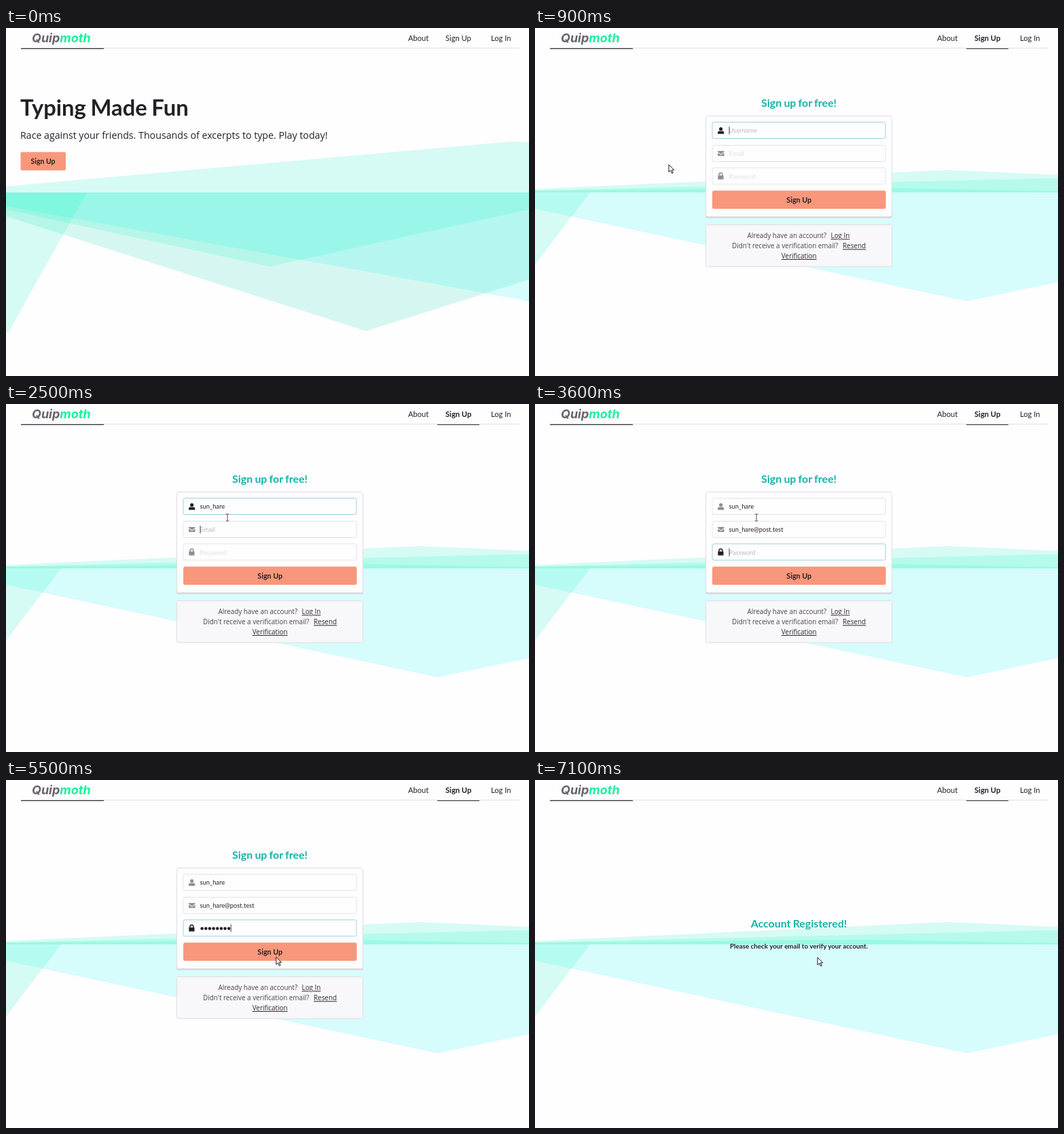
Animation, 770 px wide and 512 px high, one loop 7200 ms. Source, as an HTML page:

```html
<!DOCTYPE html>
<html lang="en">
<head>
<meta charset="utf-8">
<title>Sign up</title>
<style>
html, body { margin: 0; width: 100%; height: 100%; overflow: hidden; background: #fefdff; }
svg { display: block; width: 770px; height: 512px; font-family: Lato, sans-serif; fill: #242126; }
.b { font-weight: 700; }
.mid { text-anchor: middle; }
.tight { word-spacing: -.04em; }
.teal { fill: #14b3a9; font-weight: 700; font-size: 15.9px; }
.nav { font-size: 11.15px; }
.sans { font-family: "Open Sans", "Noto Sans", sans-serif; }
.note { font-size: 9.9px; fill: #49464c; }
.link { text-decoration: underline; fill: #2c292f; }
.logo { font: italic 700 18px Inter, sans-serif; fill: #69646b; }
.field { font-size: 9.3px; }
.box { fill: #fefdff; stroke: #dfdde2; }
.coral { fill: #f8977b; }
.rule { stroke: #3b353c; stroke-width: 1.2; }
.off { display: none; }
</style>
</head>
<body>
<svg viewBox="0 0 770 512">
  <g id="home">
    <g id="homeBg"></g>
    <text class="b tight" x="21" y="129" font-size="32.75">Typing Made Fun</text>
    <text class="sans" x="21" y="163" font-size="14.2">Race against your friends. Thousands of excerpts to type. Play today!</text>
    <rect class="coral" x="21.5" y="182.5" width="66.5" height="27" rx="2.5"/>
    <text class="b mid" x="54.5" y="199.7" font-size="10.5">Sign Up</text>
  </g>

  <g id="inner">
    <g id="innerBg"></g>
    <path class="rule" d="M635 30.4h62"/>
  </g>

  <g id="form">
    <text class="teal mid tight" x="388.5" y="116">Sign up for free!</text>
    <rect x="251" y="131" width="275" height="148.7" rx="3" fill="#d9d7dc"/>
    <rect class="box" x="251.5" y="129.5" width="274" height="148" rx="3"/>
    <g id="fields"></g>
    <rect class="coral" x="261" y="239.3" width="255.5" height="26.7" rx="2.5"/>
    <text class="b mid" x="388.7" y="256.6" font-size="10.7">Sign Up</text>
    <rect class="box" x="251.5" y="289.5" width="274" height="61.5" rx="2" style="fill:#f8f7fa"/>
    <g class="sans note">
      <text x="312.6" y="309.3">Already have an account?</text>
      <text class="link" x="435.5" y="309.3">Log In</text>
      <text x="290" y="324.3">Didn't receive a verification email?</text>
      <text class="link" x="453" y="324.3">Resend</text>
      <text class="link" x="362.7" y="339">Verification</text>
    </g>
  </g>

  <g id="done">
    <text class="teal mid tight" x="388.5" y="216.7">Account Registered!</text>
    <text class="b mid" x="388.5" y="247.6" font-size="9.8">Please check your email to verify your account.</text>
  </g>

  <path d="M22 29.5h734" stroke="#e3e0e5"/>
  <path class="rule" d="M22 30.4h122"/>
  <text class="logo" x="38" y="20.8">Quip<tspan fill="#18f29b">moth</tspan></text>
  <g class="nav">
    <text x="592" y="19.3">About</text>
    <text id="navSign" x="647" y="19.3">Sign Up</text>
    <text x="714" y="19.3">Log In</text>
  </g>

  <path id="arrow" d="M0 0v11l2.6-2.3 2 4.2 1.7-.8-2-4.1h3.4z" fill="#fff" stroke="#1c1a1e" stroke-width="1"/>
  <path id="beam" d="M-2.3-5h1.8q.5 0 .5.6.0-.6.5-.6h1.8M0-4.5v9M-2.3 5h1.8q.5 0 .5-.6.0.6.5.6h1.8" fill="none" stroke="#55525a"/>
</svg>

<script>
const LOOP = 7200, STEP = 100;
const OPEN = 900, REGISTERED = 5600;
const $ = id => document.getElementById(id);
const show = (el, on) => el.classList.toggle('off', !on);

// Translucent background shapes: colour, then points
function backdrop(id, shapes) {
  $(id).innerHTML = shapes.map(([rgb, points]) =>
    `<polygon points="${points}" fill="rgb(${rgb})" fill-opacity=".158"/>`).join('');
}
const mint = '0,240,184', green = '0,216,164', aqua = '0,246,232';
backdrop('homeBg', [
  [mint, '0,233 745,167 770,168 770,242 0,242'],
  [green, '0,242 770,242 770,370 530,446 0,277'],
  [aqua, '0,242 770,242 770,402 0,262'],
  [mint, '0,242 770,242 770,267 388,351 0,267'],
  [mint, '0,242 119,242 3,449 0,447']
]);
backdrop('innerBg', [
  [mint, '0,237 608,209 770,216 770,242 0,242'],
  [mint, '0,239 770,221 770,242 0,242'],
  [mint, '0,239.5 480,235 770,240 770,242 0,242'],
  [aqua, '0,242 770,242 770,374 635,402 0,266'],
  [mint, '0,242 81,242 0,348']
]);

// Form fields: typing runs from `from` to `to`, focus begins at `focus`
const fields = [
  { y: 138.5, hint: 'Username', value: 'sun_hare', focus: OPEN, from: 1700, to: 2400,
    icon: 'M273.6 146a2.6 2.6 0 0 1 0 5.2a2.6 2.6 0 0 1 0-5.2M269 155.7v-1.2q0-2.7 2.7-2.9q1.9.9 3.8 0q2.8.2 2.8 2.9v1.2z' },
  { y: 172.5, hint: 'Email', value: 'sun_hare@post.test', focus: 2500, from: 2700, to: 3400,
    icon: 'M269 181h9.5v1.2l-4.7 3.4l-4.8-3.4zM269 183.4l4.8 3.3l4.7-3.3v4.9h-9.5z' },
  { y: 205.8, hint: 'Password', value: '********', secret: true, focus: 3500, from: 3700, to: 4400,
    icon: 'M269.3 217h.9v-1.2a3.2 3.2 0 0 1 6.4 0v1.2h.9v5.7h-8.2zM271.7 217h3.4v-1.2a1.7 1.7 0 0 0-3.4 0z' }
];
const DOT = 5.65;
$('fields').innerHTML = fields.map(f => `<g class="field">
  <rect class="box" x="261" y="${f.y}" width="255" height="24" rx="2.5"/>
  <path d="${f.icon}" fill-rule="evenodd"/>
  <text x="285.5" y="${f.y + 15.7}"></text>
  <path fill="none" stroke="#242126" stroke-width="4.6" stroke-linecap="round" stroke-dasharray="0 ${DOT}"/>
  <path d="M286 ${f.y + 6.5}v11.5" stroke="#4a474d"/>
</g>`).join('');
fields.forEach((f, i) => {
  [f.box, f.mark, f.text, f.dots, f.caret] = $('fields').children[i].children;
});

function drawField(f, i, t) {
  const end = i < 2 ? fields[i + 1].focus : LOOP;
  const active = t >= f.focus && t < end;
  // Border and icon trail the focus by one step, except on page load
  const lag = f.focus > OPEN ? STEP : 0;
  const lit = t >= f.focus + lag && t < end + STEP;
  const progress = (t - f.from + STEP) / (f.to - f.from + STEP);
  const n = Math.floor(f.value.length * Math.max(0, Math.min(1, progress)));

  f.box.style.stroke = lit ? '#a2d0d8' : '#e5e3e8';
  f.mark.style.fill = lit ? '#242126' : '#908d93';
  f.text.textContent = !n ? f.hint : f.secret ? '' : f.value.slice(0, n);
  f.text.style.fill = n ? '#242126' : active ? '#bcb9bf' : '#e1dee4';
  show(f.dots, f.secret && n);
  f.dots.setAttribute('d', `M288.6 ${f.y + 12.7}h${DOT * (n - 1) + .1}`);

  const width = !n ? 0 : f.secret ? n * DOT : f.text.getComputedTextLength();
  const last = t < f.from ? f.focus : Math.min(t, f.to);
  f.caret.setAttribute('transform', `translate(${width})`);
  show(f.caret, active && (t - last) % 1000 < 500);
}

// Pointer stops: time, x, y
const path = [
  [100, 1, 300], [500, 55, 200], [700, 62, 199], [900, 197, 201], [1200, 326, 167],
  [4600, 326, 167], [4900, 374.5, 231.5], [5200, 396, 258], [5700, 399, 262],
  [6000, 403, 264], [6200, 403, 264], [6900, 414, 262], [7000, 414, 262], [7100, 416, 261]
];
function drawPointer(t) {
  const i = Math.max(1, path.findIndex(p => p[0] >= t));
  const [t0, x0, y0] = path[i - 1], [t1, x1, y1] = path[i];
  const k = (t - t0) / (t1 - t0);
  const beam = t >= 1100 && t < 5000;
  show($('beam'), beam);
  show($('arrow'), !beam && t > 0);
  $(beam ? 'beam' : 'arrow').setAttribute('transform',
    `translate(${x0 + (x1 - x0) * k} ${y0 + (y1 - y0) * k})`);
}

function draw(now) {
  const t = Math.floor(now % LOOP / STEP) * STEP;
  show($('home'), t < OPEN);
  show($('inner'), t >= OPEN);
  show($('form'), t >= OPEN && t < REGISTERED);
  show($('done'), t >= REGISTERED);
  $('navSign').classList.toggle('b', t >= OPEN);
  fields.forEach((f, i) => drawField(f, i, t));
  drawPointer(t);
}

let start;
function tick(now) {
  start ??= now;
  draw(now - start);
  requestAnimationFrame(tick);
}
draw(0);
requestAnimationFrame(tick);
</script>
</body>
</html>
```
